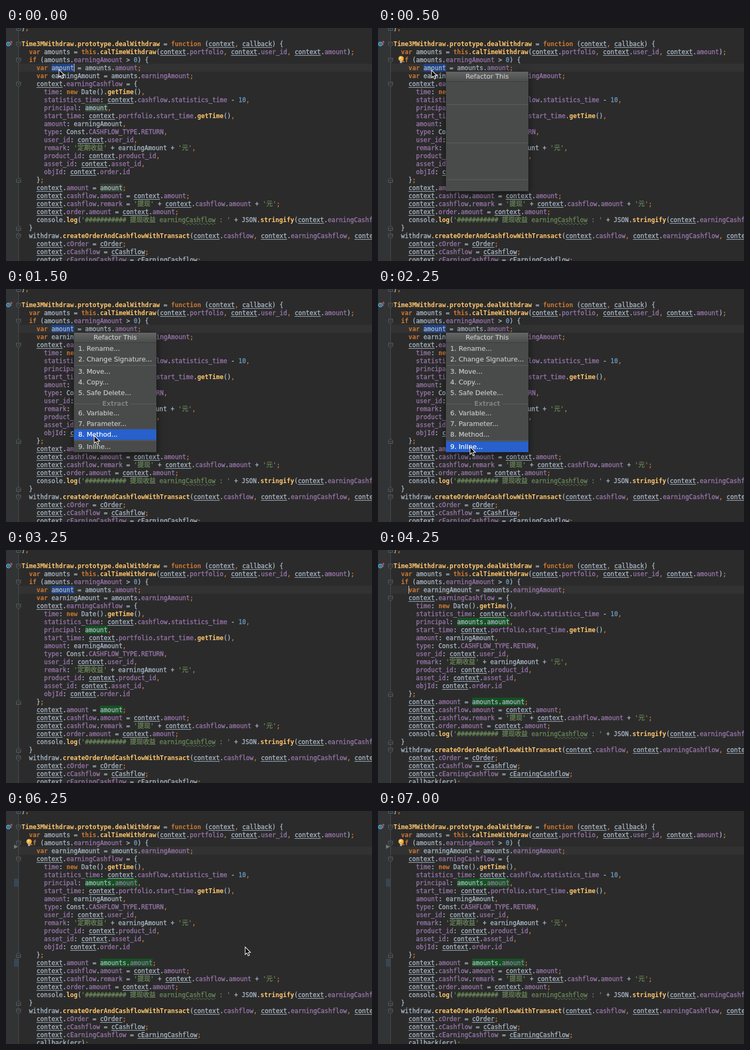
Write an HTML page that moves like this. It is 684 by 437 pixels and loops after 7250 ms.

```html
<!DOCTYPE html>
<html lang="en">
<head>
<meta charset="utf-8">
<title>Inline variable refactoring</title>
<style>
html, body { margin: 0; width: 100%; height: 100%; overflow: hidden; background: #2b2b2b; }
#stage { position: relative; width: 684px; height: 437px; overflow: hidden; background: #2b2b2b; }
#stage > *, .menu > * { position: absolute; }
i { font-style: normal; }
.gutter { left: 0; top: 0; width: 23px; height: 437px; background: #313335; border-right: 1px solid #4b4d4e; }
.line { left: 24px; top: 67px; width: 660px; height: 15px; background: #323232; }
.code { left: 29px; top: -8px; color: #a9b7c6; font: 11.627px/17px "DejaVu Sans Mono", monospace; white-space: pre;
  -webkit-text-stroke: .35px; }
.code div { height: 15px; }
.key { color: #cc7832; font-weight: bold; -webkit-text-stroke: 0; }
.punct { color: #cc7832; }
.str { color: #6a8759; }
.num { color: #6897bb; }
.call { color: #ffc66d; font-weight: bold; -webkit-text-stroke: 0; }
.prop { color: #9876aa; }
.outer { text-decoration: underline 1px; text-underline-offset: 2px; text-decoration-skip-ink: none; }
.typo { text-decoration: underline wavy #5a7d4c 1px; text-underline-offset: 1px; text-decoration-skip-ink: none; }
.cjk { font: 12px/0 "Noto Sans CJK SC", "Noto Sans CJK JP", sans-serif; }
.hit, .sel { display: inline-block; height: 15px; }
.hit { background: #344134; }
.found .hit { background: #155221; }
.fresh .hit .prop { color: inherit; }
.sel { background: #214283; }
.caret { top: 67px; width: 1px; height: 15px; background: #d0d0d0; }
.bar { left: 15px; width: 8px; height: 15px; background: #374752; }
.menu { left: 127px; top: 82px; width: 154px; height: 224px; background: #494b4b;
  box-shadow: 0 4px 14px rgba(0, 0, 0, .55); color: #c8c8c8; font: 12.3px/21px "DejaVu Sans", sans-serif; white-space: pre;
  -webkit-text-stroke: .2px; }
.menu .head { left: 0; top: 0; width: 154px; height: 19px; line-height: 19px; text-align: center;
  background: linear-gradient(#646666, #4b4d4d); border-bottom: 1px solid #3b3d3d; box-sizing: border-box; }
.menu .item { left: 0; width: 146px; height: 20px; padding-left: 8px; }
.menu .on { background: #2860cc; color: #fff; }
.menu .rule { left: 0; width: 154px; height: 1px; background: #5d5f5f; }
.menu .group { left: 49px; top: 123px; width: 56px; text-align: center; background: #494b4b; color: #7f8181;
  font-weight: bold; font-size: 12px; -webkit-text-stroke: 0; }
svg { left: 0; top: 0; overflow: visible; }
</style>
</head>
<body>
<div id="stage">
  <div class="gutter"></div>
  <div class="line"></div>
  <div class="bar" style="top:127px" data-on="18-28"></div>
  <div class="bar" style="top:277px" data-on="18-28"></div>
  <div class="code" id="before" data-on="0-16"></div>
  <div class="code" id="after" data-on="17-28"></div>
  <svg id="foldsBefore" width="684" height="437" data-on="0-16"></svg>
  <svg id="foldsAfter" width="684" height="437" data-on="17-28"></svg>
  <svg width="684" height="437">
    <circle cx="4.5" cy="30" r="3.4" fill="none" stroke="#56aeda" stroke-width="1.7"/>
    <circle cx="4.5" cy="30" r="1.4" fill="#56aeda"/>
    <path d="M10 32V25M8 27.2L10 24.6L12 27.2" fill="none" stroke="#c75450" stroke-width="1.2"/>
  </svg>
  <svg width="684" height="437" data-on="18-28"><path d="M15 63L22.5 67L15 71Z" fill="#75787a"/></svg>
  <svg width="684" height="437" data-on="1-2 21-28">
    <circle cx="43" cy="57.3" r="4.9" fill="#f4af3d"/>
    <circle cx="42" cy="56" r="2" fill="#ffd98a"/>
    <path d="M41 61.5h4v4h-4z" fill="#c9c9c9"/>
    <path d="M41 63.5h4" stroke="#777"/>
  </svg>
  <div class="caret" style="left:127px" data-on="0-0"></div>
  <div class="caret" style="left:57px" data-on="17-24 27-27"></div>
  <div class="menu" id="menu" data-on="2-9">
    <div class="head">Refactor This</div>
    <div class="rule" style="top:61px"></div>
    <div class="rule" style="top:133px"></div>
    <div class="rule" style="top:202px"></div>
    <div class="group" data-on="3-9">Extract</div>
  </div>
  <svg id="mouse" width="12" height="19">
    <path d="M0 0V14.2L3.2 11.2L5.6 16.6L8 15.5L5.7 10.3H10Z" fill="#000" stroke="#fff" stroke-width="1.1"/>
  </svg>
</div>
<script>
const $ = id => document.getElementById(id);
const TICK = 250, TICKS = 29;

// « » wraps a usage highlight, ‹ › the selection.
const source = (declaration, value) => `};

Time3MWithdraw.prototype.dealWithdraw = function (context, callback) {
  var amounts = this.calTimeWithdraw(context.portfolio, context.user_id, context.amount);
  if (amounts.earningAmount > 0) {
${declaration}    var earningAmount = amounts.earningAmount;
    context.earningCashflow = {
      time: new Date().getTime(),
      statistics_time: context.cashflow.statistics_time - 10,
      principal: «${value}»,
      start_time: context.portfolio.start_time.getTime(),
      amount: earningAmount,
      type: Const.CASHFLOW_TYPE.RETURN,
      user_id: context.user_id,
      remark: '定期收益' + earningAmount + '元',
      product_id: context.product_id,
      asset_id: context.asset_id,
      objId: context.order.id
    };
    context.amount = «${value}»;
    context.cashflow.amount = context.amount;
    context.cashflow.remark = '提现' + context.cashflow.amount + '元';
    context.order.amount = context.amount;
    console.log('########### 提现收益 earningCashflow : ' + JSON.stringify(context.earningCashflow));
  }
  withdraw.createOrderAndCashflowWithTransact(context.cashflow, context.earningCashflow, context.order);
    context.cOrder = cOrder;
    context.cCashflow = cCashflow;
    context.cEarningCashflow = cEarningCashflow;
    callback(err);`;

const tag = (name, text) => `<i class="${name}">${text}</i>`;
const syntax = new RegExp([
  "(?<str>'[^']*')",
  "(?<call>Time3M[\\w.]+|(?<=\\.)\\w+(?=\\())",
  "(?<prop>(?<=\\.)\\w+|\\w+(?=:))",
  "(?<key>\\b(?:var|function|if|this|new)\\b)",
  "(?<outer>\\b(?:context|callback|cOrder|cCashflow|cEarningCashflow)\\b)",
  "(?<num>\\b\\d+\\b)",
  "(?<punct>[,;])"
].join("|"), "g");

function paint(line) {
  return line.replace(syntax, (text, ...rest) => {
    const groups = rest[rest.length - 1];
    const name = Object.keys(groups).find(k => groups[k] !== undefined);
    if (name === "str") {
      text = text.replace(/[\u4e00-\u9fff]+/g, s => tag("cjk", s)).replace("Cashflow", s => tag("typo", s));
    }
    return tag(name, text);
  }).replace(/«/g, '<i class="hit">').replace(/‹/g, '<i class="sel">').replace(/[»›]/g, "</i>");
}

const fill = (id, text) => {
  $(id).innerHTML = text.split("\n").map(l => `<div>${paint(l)}</div>`).join("");
};
fill("before", source("    var ‹amount› = amounts.amount;\n", "amount"));
fill("after", source("", "amounts.amount"));

// Fold marks: pentagons pointing down at a block's start, up at its end.
function folds(id, starts, ends) {
  const mark = (y, dir) =>
    `<path transform="translate(23.5 ${y + .5}) scale(1 ${dir})" d="M-4 -4H4V1.5L0 5L-4 1.5ZM-2 -.5H2" fill="#2f3132" stroke="#606365"/>`;
  $(id).innerHTML = starts.map(y => mark(y, 1)).concat(ends.map(y => mark(y, -1))).join("");
}
folds("foldsBefore", [30, 60, 105, 390], [0, 285, 375]);
folds("foldsAfter", [30, 60, 90, 375], [0, 270, 360]);

const items = [
  ["Rename", 20], ["Change Signature", 40], ["Move", 63], ["Copy", 83], ["Safe Delete", 103],
  ["Variable", 141], ["Parameter", 161], ["Method", 181], ["Inline", 204]
].map(([label, top], n) => {
  const el = document.createElement("div");
  el.className = "item";
  el.style.top = top + "px";
  el.textContent = `${n + 1}. ${label}...`;
  el.dataset.on = "3-9";
  return $("menu").appendChild(el);
});

// [first tick, value...]; each step holds until the next.
const picks = [[0, -1], [3, 0], [5, 3], [6, 7], [7, 8]];
const moves = [
  [0, 99, 78], [1, 100, 79], [5, 150, 202], [6, 165, 275], [7, 175, 298], [9, 172, 296],
  [11, 174, 297], [12, 605, 343], [13], [18, 579, 292], [19, 569, 278], [20, 516, 268],
  [21, 418, 258], [22, 422, 258], [25, 447, 255], [26]
];
const at = (steps, tick) => steps.filter(s => s[0] <= tick).pop();

const timed = [...document.querySelectorAll("[data-on]")].map(el => ({
  el, spans: el.dataset.on.split(" ").map(s => s.split("-").map(Number))
}));

function draw(tick) {
  for (const { el, spans } of timed) {
    el.style.display = spans.some(([a, b]) => tick >= a && tick <= b) ? "" : "none";
  }
  $("before").classList.toggle("found", tick >= 10);
  $("after").className = tick < 20 ? "code found fresh" : "code found";
  const pick = at(picks, tick)[1];
  items.forEach((el, n) => el.classList.toggle("on", n === pick));
  const [, x, y] = at(moves, tick);
  $("mouse").style.display = x === undefined ? "none" : "";
  $("mouse").style.transform = `translate(${x || 0}px, ${y || 0}px)`;
}

let start, last;
function frame(now) {
  start ??= now;
  const tick = Math.floor((now - start) / TICK) % TICKS;
  if (tick !== last) draw(last = tick);
  requestAnimationFrame(frame);
}
draw(0);
requestAnimationFrame(frame);
</script>
</body>
</html>
```
